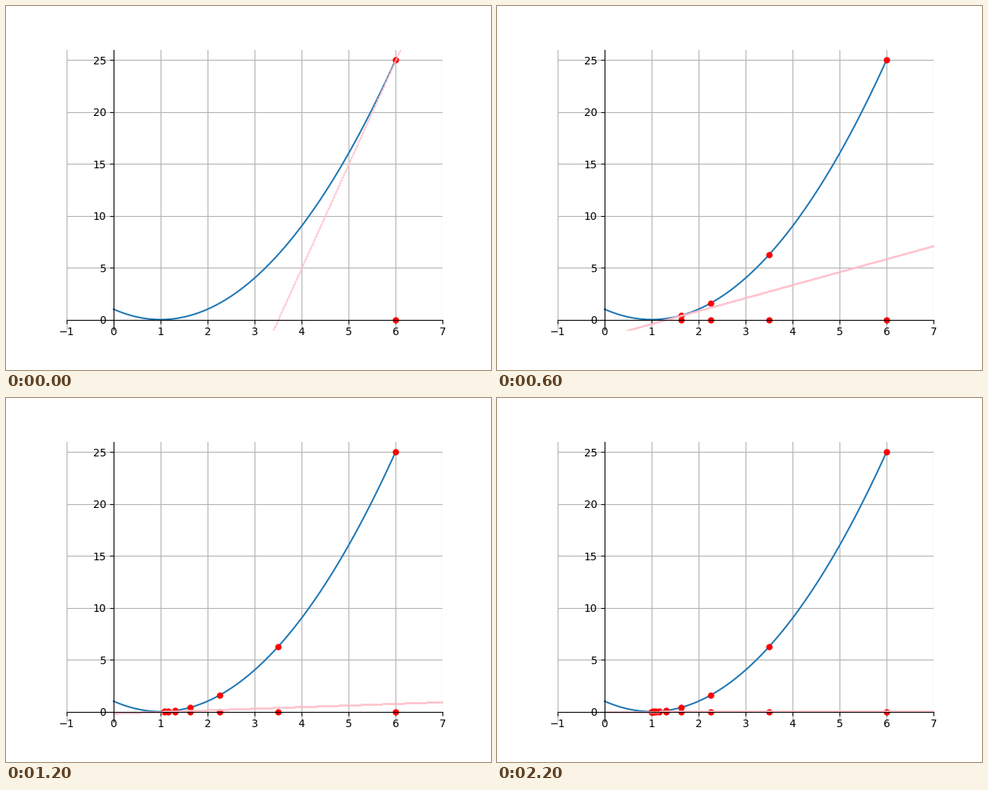
A matplotlib script that plays this animation: 640x480 px, repeating every 2400 ms.

```python
import numpy as np
import matplotlib.pyplot as plt
from matplotlib.animation import FuncAnimation

STEPS = 12
INTERVAL = 200  # ms


def f(x):
    return (x - 1) ** 2


def df(x):
    return 2 * (x - 1)


def newton(x, count):
    points = [x]
    while len(points) < count:
        x -= f(x) / df(x)
        points.append(x)
    return np.array(points)


roots = newton(6.0, STEPS)
tangent_x = np.linspace(0, 7, 701)

fig, ax = plt.subplots(figsize=(6.4, 4.8), dpi=100)
ax.set_xlim(-1, 7)
ax.set_ylim(-1, 26)
ax.set_xticks(range(-1, 8))
ax.set_yticks(range(0, 26, 5))
ax.grid(True)
for side in ("top", "right"):
    ax.spines[side].set_visible(False)
for side in ("left", "bottom"):
    ax.spines[side].set_position(("data", 0))

curve_x = np.linspace(0, 6, 200)
ax.plot(curve_x, f(curve_x), color="tab:blue")
on_axis, = ax.plot([], [], "r.", ms=10)
on_curve, = ax.plot([], [], "r.", ms=10)
tangent, = ax.plot([], [], ".", color="pink", ms=1)


def update(step):
    xs = roots[:step + 1]
    x = xs[-1]
    on_axis.set_data(xs, np.zeros_like(xs))
    on_curve.set_data(xs, f(xs))
    tangent.set_data(tangent_x, f(x) + df(x) * (tangent_x - x))
    return on_axis, on_curve, tangent


anim = FuncAnimation(fig, update, frames=STEPS, interval=INTERVAL,
                     repeat=True, repeat_delay=0)
plt.show()
```
